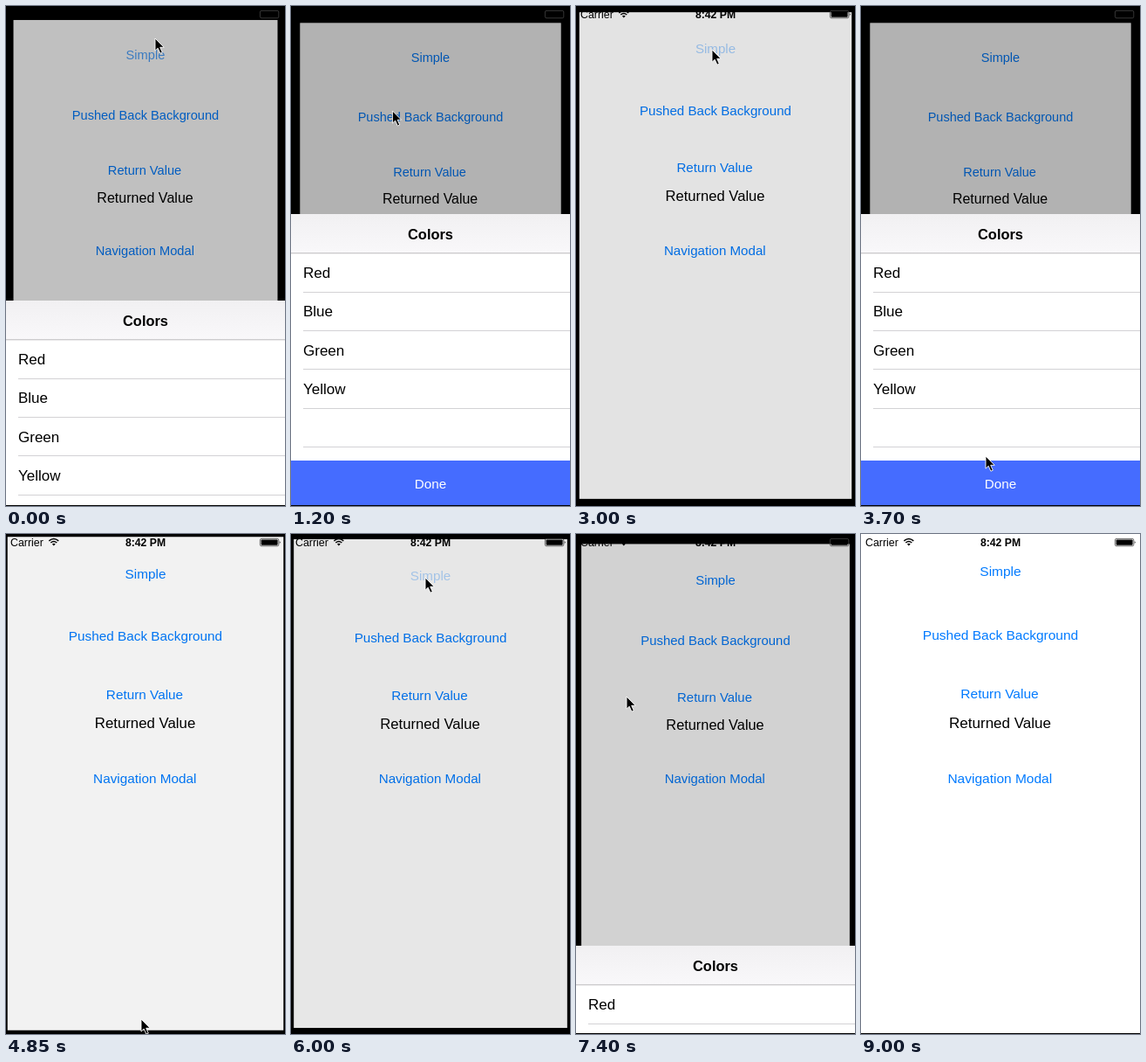
An HTML page that plays this animation: 320 px wide and 572 px high, repeating every 9050 ms.

```html
<!DOCTYPE html>
<html lang="en">
<head>
<meta charset="utf-8">
<title>Semi modal</title>
<style>
  html, body { margin: 0; width: 100%; height: 100%; overflow: hidden; background: #000; }
  svg { display: block; width: 320px; height: 572px; }
  text { font-family: "Liberation Sans", Arial, sans-serif; }
  .mid { text-anchor: middle; }
  .link { font-size: 15.5px; fill: #007aff; }
  .body { font-size: 17px; }
  .line { stroke: #d3d2d5; stroke-width: 1; }
</style>
</head>
<body>
<svg viewBox="0 0 320 572">
  <defs>
    <clipPath id="screen"><rect width="320" height="571"/></clipPath>
    <linearGradient id="bar" x2="0" y2="1">
      <stop offset="0" stop-color="#f1f0f2"/>
      <stop offset="1" stop-color="#f9f8fa"/>
    </linearGradient>
  </defs>
  <rect width="320" height="572"/>
  <g clip-path="url(#screen)">
    <g id="page">
      <rect width="320" height="571" fill="#fff"/>
      <g class="mid">
        <text id="simple" class="link" x="160" y="48">Simple</text>
        <text class="link" x="160" y="120.5">Pushed Back Background</text>
        <text class="link" x="159" y="188">Return Value</text>
        <text class="body" x="159.5" y="221.5">Returned Value</text>
        <text class="link" x="159.3" y="285">Navigation Modal</text>
      </g>
      <rect id="dim" width="320" height="571"/>
    </g>

    <g id="status">
      <text x="5" y="14" font-size="12.4">Carrier</text>
      <g fill="none" stroke="#000" stroke-width="1.5">
        <path d="M49.3 7.9Q54.8 3.1 60.3 7.9M51.3 10Q54.8 7 58.3 10"/>
      </g>
      <path d="M52.9 11.5Q54.8 9.9 56.7 11.5L54.8 13.5Z"/>
      <text class="mid" x="160" y="14" font-size="12.2" font-weight="700">8:42 PM</text>
      <rect x="291.4" y="5.4" width="21.4" height="8.4" rx="1.6" fill="none" stroke="#444" stroke-width=".8"/>
      <rect x="292.6" y="6.5" width="19" height="6.2" rx=".8"/>
      <path d="M313.8 8Q315.6 9.6 313.8 11.2Z"/>
    </g>

    <g id="panel">
      <rect width="320" height="334" fill="#fff"/>
      <rect width="320" height="45" fill="url(#bar)"/>
      <path d="M0 44.8H320" stroke="#bbb9bd"/>
      <text class="mid" x="160" y="29" font-size="16.4" font-weight="700">Colors</text>
      <g id="rows"></g>
      <rect y="282" width="320" height="52" fill="#456cff"/>
      <text class="mid" x="160" y="313.5" font-size="15.2" fill="#fff">Done</text>
    </g>
  </g>
  <path id="cursor" d="M0 0V14.2L3.2 11.2 5.9 17.2 8.3 16.1 5.7 10.3H10.2Z" stroke="#fff" stroke-width=".9"/>
</svg>
<script>
const LOOP = 9050, STEP = 50, SLIDE = 260;
const OPEN_TOP = 238, TRAVEL = 572, ROW = 44.3;
const $ = id => document.getElementById(id);
const clamp = v => Math.max(0, Math.min(1, v));
const mix = (a, b, k) => a + (b - a) * k;

// [start, opens]
const slides = [
  [-185, 1], [2161, 0], [2890, 1], [4664, 0], [5900, 1], [7284, 0]
];

// [time, x, y] of the pointer tip
const pointer = [
  [0, 171, 37], [300, 171, 37], [900, 130, 100], [1700, 87, 163],
  [2300, 87, 163], [2800, 156, 50], [3000, 156, 50], [3700, 143, 515],
  [4500, 155, 555], [4900, 155, 555], [5650, 154, 50], [6250, 154, 50],
  [7000, 58, 186], [7600, 58, 186], [8550, 130, 266], [8950, 205, 122]
];

$('rows').innerHTML = ['Red', 'Blue', 'Green', 'Yellow', ''].map((name, i) => {
  const y = i * ROW;
  return `<text class="body" x="14" y="${73 + y}">${name}</text>` +
    `<path class="line" d="M14 ${Math.round(88.8 + y) + .5}H320"/>`;
}).join('');

// cubic-bezier(.42, 0, .58, 1)
function easeInOut(x) {
  let lo = 0, hi = 1;
  for (let i = 0; i < 24; i++) {
    const u = (lo + hi) / 2, v = 1 - u;
    if (1.26 * u * v * v + 1.74 * u * u * v + u ** 3 < x) lo = u; else hi = u;
  }
  return lo * lo * (3 - 2 * lo);
}

function openness(t) {
  const [start, opens] = slides.filter(s => s[0] <= t).pop();
  const k = easeInOut(clamp((t - start) / SLIDE));
  return opens ? k : 1 - k;
}

// The tapped button fades back from its pressed look.
function buttonAlpha(t) {
  const tap = slides.find(([s, opens]) => opens && t >= s - 60 && t < s + 260);
  return tap ? mix(.2, 1, clamp((t - tap[0] - 80) / 170)) : 1;
}

function pointerAt(t) {
  const i = pointer.findIndex(key => key[0] > t);
  if (i < 0) return pointer[pointer.length - 1].slice(1);
  const [t0, x0, y0] = pointer[i - 1], [t1, x1, y1] = pointer[i];
  const k = (t - t0) / (t1 - t0), s = k * k * (3 - 2 * k);
  return [mix(x0, x1, s), mix(y0, y1, s)];
}

function draw(t) {
  const p = openness(t), [x, y] = pointerAt(t);
  const sx = 1 - .065 * p, sy = 1 - .068 * p;
  $('page').setAttribute('transform',
    `translate(160 285.5) scale(${sx} ${sy}) translate(-160 -285.5)`);
  $('dim').setAttribute('opacity', .3 * p);
  $('simple').setAttribute('opacity', buttonAlpha(t));
  $('panel').setAttribute('transform', `translate(0 ${Math.round(OPEN_TOP + TRAVEL * (1 - p))})`);
  $('cursor').setAttribute('transform', `translate(${x} ${y})`);
  $('cursor').setAttribute('visibility', t < 9000 ? 'visible' : 'hidden');
}

const began = performance.now();
function tick() {
  const t = (performance.now() - began) % LOOP;
  draw(Math.floor(t / STEP) * STEP);
  requestAnimationFrame(tick);
}
draw(0);
requestAnimationFrame(tick);
</script>
</body>
</html>
```
